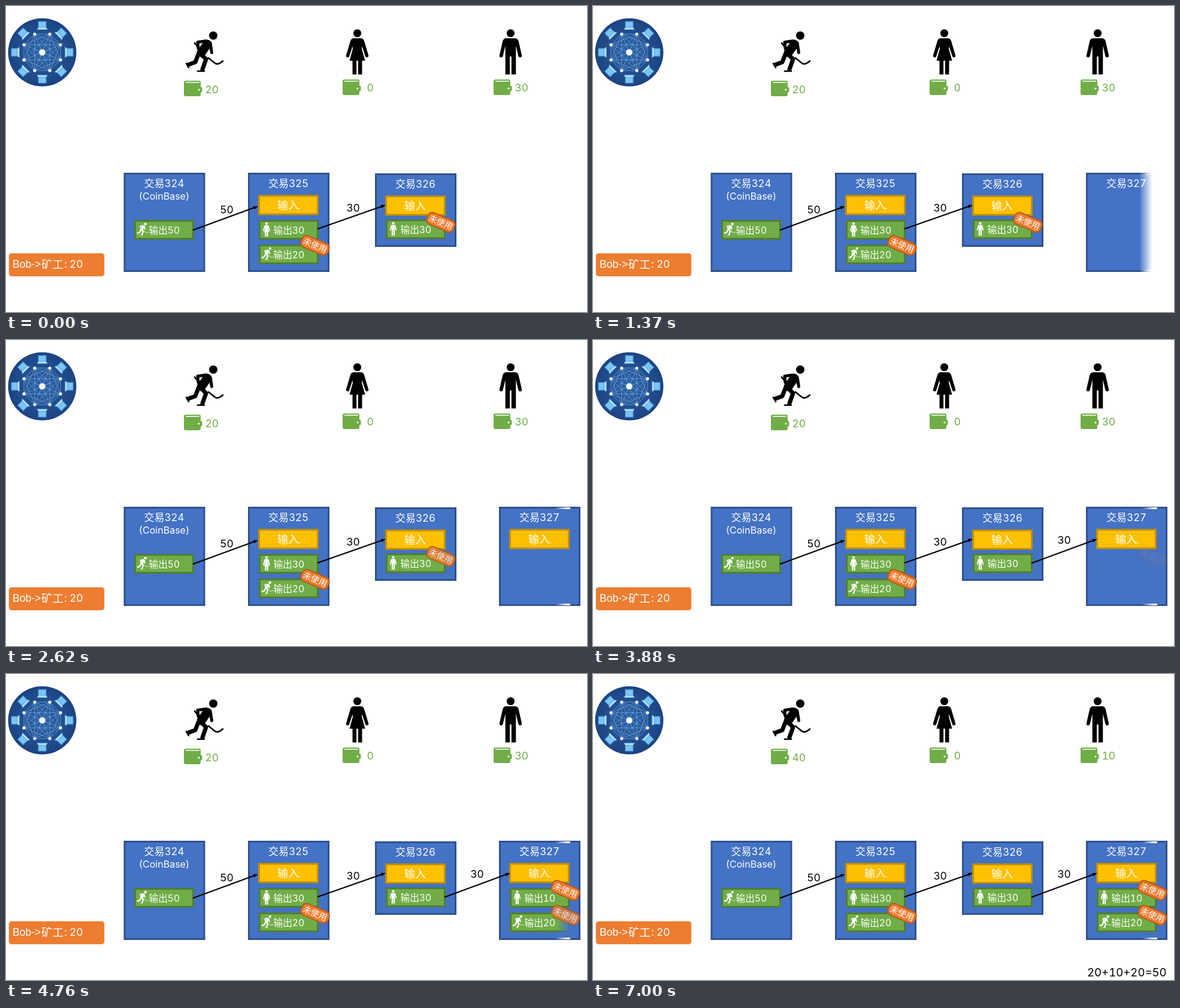
An HTML page for the animation above (8000 ms loop, 970 px wide and 512 px high).

```html
<!DOCTYPE html>
<html lang="zh">
<head>
<meta charset="utf-8">
<title>交易</title>
<style>
html, body { margin: 0; width: 100%; height: 100%; overflow: hidden; background: #fff; }
svg { display: block; width: 970px; height: 512px; font-family: Inter, "Noto Sans CJK SC", "Noto Sans CJK", sans-serif; font-variant-numeric: tabular-nums; }
.limbs { fill: none; stroke: currentColor; stroke-linejoin: round; stroke-linecap: round; }
</style>
</head>
<body>
<svg id="stage" viewBox="0 0 970 512" xmlns="http://www.w3.org/2000/svg">
<defs>
  <marker id="head" viewBox="0 0 8 6" refX="5" refY="3" markerWidth="8" markerHeight="6" markerUnits="userSpaceOnUse" orient="auto"><path d="M0 0L8 3L0 6Z"/></marker>
  <radialGradient id="globe"><stop offset="0" stop-color="#2c67ae"/><stop offset=".6" stop-color="#214f92"/><stop offset="1" stop-color="#1d4380"/></radialGradient>
  <linearGradient id="shine"><stop offset="0" stop-color="#fff" stop-opacity="0"/><stop offset=".8" stop-color="#fff"/></linearGradient>
  <g id="man" fill="currentColor">
    <circle cy="7" r="6.6"/>
    <path d="M-8 15.5H8Q12 16 13.2 20L18.6 44a2.9 2.9 0 0 1-5.6 1.5L8.8 28V76H1.4V46H-1.4V76H-8.8V28L-13 45.5a2.9 2.9 0 0 1-5.6-1.5L-13.2 20Q-12 16-8 15.5Z"/>
  </g>
  <g id="woman" fill="currentColor">
    <circle cy="7" r="6.6"/>
    <path d="M-6 15.5H6Q10 15.5 11.5 20L18.6 44a2.7 2.7 0 0 1-5.2 1.5L8 29L7.5 33L13 53H8V76H1.4V53H-1.4V76H-8V53H-13L-7.5 33L-8 29L-13.4 45.5a2.7 2.7 0 0 1-5.2-1.5L-11.5 20Q-10 15.5-6 15.5Z"/>
  </g>
  <g id="miner" class="limbs">
    <circle cx="46" cy="7.5" r="7" fill="currentColor" stroke="none"/>
    <path d="M36 22L26 36" stroke-width="15"/>
    <path d="M34 16.5L20 18.5L21 29M41 20L43.5 36" stroke-width="5"/>
    <path d="M21 39L16 52L5 56M26 39L34 47L28 64" stroke-width="7"/>
    <path d="M15 20L22 29M38 45L48 53Q53 58 62 50M1 54L5 61M20 67H31" stroke-width="2.6"/>
  </g>
  <g id="wallet" fill="#70ad47">
    <path d="M3 0H26Q28 0 28 3V23Q28 26 25 26H3Q0 26 0 23V3Q0 0 3 0Z"/>
    <path d="M3 2.8H26" stroke="#fff" stroke-width="1.5"/>
    <rect x="21" y="10.5" width="9.5" height="9" rx="2"/>
    <circle cx="25" cy="15" r="1.6" fill="#fff"/>
  </g>
</defs>
</svg>
<script>
const svg = document.getElementById('stage');
const LOOP = 8000, SOFT = 22;

const text = (x, y, s, size, fill = '#fff', more = '') =>
  `<text x="${x}" y="${y}" font-size="${size}" fill="${fill}" ${more}>${s}</text>`;
const mid = (x, y, s, size, fill) => text(x, y, s, size, fill, 'text-anchor="middle"');
const light = (x, y, s, size) => text(x, y, s, size, '#fff', 'font-weight="300"');
const box = (x, y, w, h, fill, stroke) =>
  `<rect x="${x + 1.5}" y="${y + 1.5}" width="${w - 3}" height="${h - 3}" fill="${fill}" stroke="${stroke}" stroke-width="3"/>`;
const use = (id, x, y, scale = 1, color = '#000') =>
  `<use href="#${id}" transform="translate(${x} ${y}) scale(${scale})" color="${color}"/>`;

const block = (x, y, h, name) => box(x, y, 136, h, '#4472c4', '#2f528f') + mid(x + 67.5, y + 24, name, 17);
const input = (x, y) => box(x, y, 101, 34, '#ffc000', '#bf8f00') + light(x + 32, y + 24, '输入', 18);
const dot = (x, y) => `<circle cx="${x}" cy="${y}" r=".9" fill="#fff"/>`;

const icons = {
  miner: (x, y) => use('miner', x + 4.5, y + 4.5, .31, '#fff'),
  woman: (x, y) => use('woman', x + 13, y + 3.5, .32, '#fff'),
  man: (x, y) => use('man', x + 12.5, y + 4.5, .3, '#fff')
};
const output = (x, y, who, sum) => box(x, y, 100, 33, '#70ad47', '#507e32') +
  icons[who](x, y) + text(x + 24.5, y + 22.5, '输出' + sum, 15.7);

const badge = (x, y) => `<g transform="translate(${x} ${y}) rotate(23)">
  <rect x="-24" y="-10.3" width="48" height="20.6" rx="7.5" fill="#ed7d31" stroke="#b9591b" stroke-width="2"/>
  ${mid(0, 5, '未使用', 14)}</g>`;
const arrow = (x1, y1, x2, y2, sum, tx, ty) =>
  `<path d="M${x1} ${y1}L${x2 - 3} ${y2 + 1}" stroke="#000" stroke-width="2.2" marker-end="url(#head)"/>` +
  mid(tx, ty, sum, 17.5, '#000');
const streak = y => `<rect x="917" y="${y}" width="25" height="3" fill="url(#shine)"/>`;
const layer = (id, body) => `<g id="${id}">${body}</g>`;

function network(cx, cy) {
  const at = (k, r) => [cx + r * Math.cos(k * Math.PI / 4), cy + r * Math.sin(k * Math.PI / 4)];
  const nodes = Array.from({length: 8}, (_, k) => at(k + .5, 33));
  let s = `<circle cx="${cx}" cy="${cy}" r="57" fill="url(#globe)"/>`, lines = '';
  nodes.forEach((a, i) => nodes.slice(i + 1).forEach(b => lines += `M${a}L${b}`));
  s += `<path d="${lines}" fill="none" stroke="#a5cdf0" stroke-width=".7" opacity=".75"/>`;
  nodes.forEach(([x, y], k) => {
    const [lx, ly] = at(k, 45.5);
    s += `<circle cx="${x}" cy="${y}" r="2.6" fill="#fff"/>
      <g transform="translate(${lx} ${ly}) rotate(${k * 45 + 90})">
        <rect x="-6.5" y="-6" width="13" height="10" fill="#7cc4f5" stroke="#3f8fd0"/>
        <path d="M-6.5 4H6.5L9 7.5H-9Z" fill="#a9dcfb"/></g>`;
  });
  return s + `<circle cx="${cx}" cy="${cy}" r="5.3" fill="#fff"/>`;
}

const green = '#70ad47';
const funds = (miner, man) => text(332.5, 145.5, miner, 17.5, green) + text(849.5, 142.5, man, 17.5, green);

svg.insertAdjacentHTML('beforeend', [
  network(60.5, 77.5),
  use('miner', 300, 42), use('woman', 586.5, 38.5), use('man', 842.5, 38.5),
  use('wallet', 297, 125), use('wallet', 562, 123), use('wallet', 814, 123),
  text(602.5, 142.5, '0', 17.5, green),
  layer('before', funds(20, 30)),
  layer('after', funds(40, 10)),

  '<rect x="4.5" y="413.5" width="160" height="39" rx="5" fill="#ed7d31" stroke="#fbe3d3"/>',
  text(11, 438, 'Bob-&gt;', 17.5, '#fff', 'font-family="Liberation Sans, sans-serif"'),
  light(59, 438.5, '矿工', 18.5), text(97, 438, ':', 18), text(106, 438, '20', 17.5),

  block(196.5, 279, 166, '交易324'), mid(264, 324, '(CoinBase)', 16),
  output(214, 358, 'miner', 50),
  block(404, 279, 166, '交易325'), input(421, 316), dot(490, 339),
  output(422, 358, 'woman', 30), output(422, 399, 'miner', 20),
  block(616, 280, 123, '交易326'), input(633, 317),
  output(634, 357, 'man', 30),
  layer('block', block(823, 279, 166, '交易327') + streak(280) + streak(441)),
  layer('input', input(840, 316) + dot(909, 339)),
  layer('out1', output(841, 358, 'man', 10)),
  layer('out2', output(841, 399, 'miner', 20)),

  arrow(312, 375, 421, 335, 50, 368.5, 346.5),
  arrow(520, 373, 634, 333, 30, 579.5, 343.5),
  layer('arrow', arrow(732, 373.5, 842, 333, 30, 786.5, 340.5)),
  badge(516, 400.5), layer('spent', badge(726, 362)),
  layer('badge1', badge(934, 362)), layer('badge2', badge(934, 403.5)),
  layer('sum', text(825, 506, '20+10+20=50', 18.6, '#000'))
].join(''));

// id, left, width, start, end
const wipes = [
  ['block', 823, 136, 1020, 1520],
  ['input', 840, 101, 1570, 2080],
  ['arrow', 731, 112, 2600, 3100],
  ['out1', 841, 101, 3870, 4350],
  ['out2', 841, 101, 4360, 4850],
  ['sum', 824, 134, 6540, 7000]
];
// id, start, end, from, to
const fades = [
  ['spent', 2550, 3080, 1, 0],
  ['badge1', 3850, 4350, 0, 1],
  ['badge2', 4360, 4850, 0, 1],
  ['before', 4800, 5300, 1, 0],
  ['after', 4800, 5300, 0, 1]
];

const get = id => document.getElementById(id);
for (const [id] of wipes) {
  svg.insertAdjacentHTML('beforeend', `<defs>
    <linearGradient id="${id}Edge" gradientUnits="userSpaceOnUse" y1="0" y2="0"><stop stop-color="#fff"/><stop offset="1" stop-color="#000"/></linearGradient>
    <mask id="${id}Mask" maskUnits="userSpaceOnUse" x="0" y="0" width="970" height="512"><rect width="970" height="512" fill="url(#${id}Edge)"/></mask></defs>`);
  get(id).setAttribute('mask', `url(#${id}Mask)`);
}

const progress = (t, a, b) => Math.min(1, Math.max(0, (t - a) / (b - a)));

function draw(now) {
  const t = now % LOOP;
  for (const [id, x, w, a, b] of wipes) {
    const edge = x - SOFT + (w + SOFT) * progress(t, a, b), g = get(id + 'Edge');
    g.setAttribute('x1', edge);
    g.setAttribute('x2', edge + SOFT);
  }
  for (const [id, a, b, from, to] of fades)
    get(id).setAttribute('opacity', from + (to - from) * progress(t, a, b));
  requestAnimationFrame(draw);
}
draw(performance.now());
</script>
</body>
</html>
```
